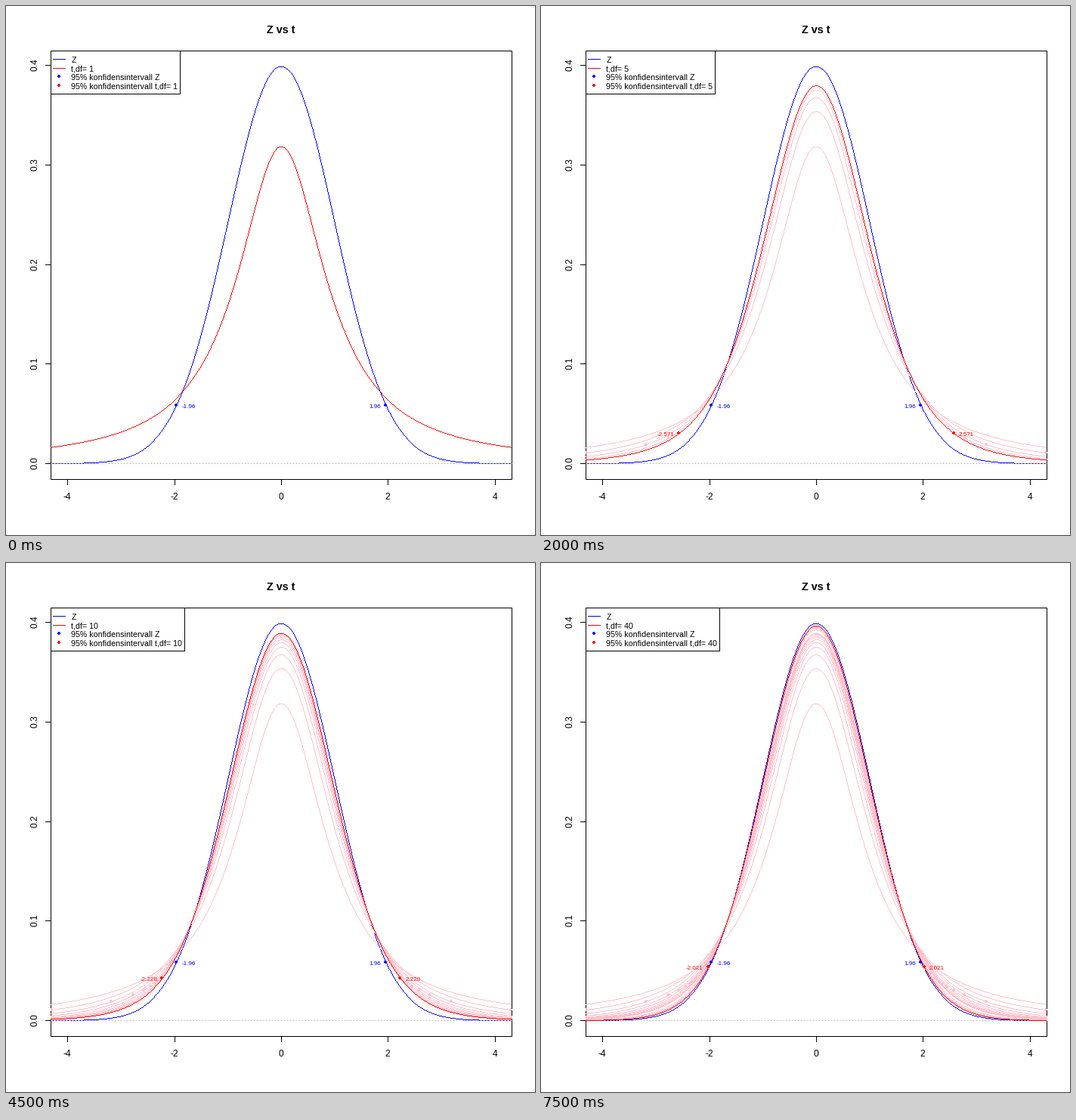
A matplotlib script that plays this animation: 700 by 700 pixels, repeating every 8000 ms.

```python
import math

import matplotlib.pyplot as plt
import numpy as np
from matplotlib.animation import ArtistAnimation
from matplotlib.patches import PathPatch, Rectangle
from matplotlib.path import Path

SIZE, DPI = 700, 100
PT = 72 / DPI  # points per pixel
LEFT, RIGHT, TOP, BOTTOM = 59.04, 669.76, 59.04, 626.56
X_MAX = 4 * 1.08
PEAK = 1 / math.sqrt(2 * math.pi)
DFS = [*range(1, 11), *range(15, 41, 5)]

plt.rcParams["font.family"] = "Liberation Sans"

fig = plt.figure(figsize=(SIZE / DPI, SIZE / DPI), dpi=DPI, facecolor="white")
ax = fig.add_axes([0, 0, 1, 1])
ax.set_xlim(0, SIZE)
ax.set_ylim(SIZE, 0)
ax.axis("off")
region = Rectangle((59, 59), 611, 568, transform=ax.transData)


def px(x):
    return (LEFT + RIGHT) / 2 + x * (RIGHT - LEFT) / (2 * X_MAX)


def py(y):
    return BOTTOM - (y + 0.04 * PEAK) * (BOTTOM - TOP) / (1.08 * PEAK)


def normal_pdf(x):
    return PEAK * np.exp(-x**2 / 2)


def t_pdf(x, df):
    c = math.gamma((df + 1) / 2) / math.gamma(df / 2) / math.sqrt(df * math.pi)
    return c * (1 + x**2 / df) ** (-(df + 1) / 2)


def t_limit(df):
    """97.5% quantile, from x = sqrt(df) tan(a), where the density is cos(a)^(df-1)."""
    a = np.linspace(0, math.pi / 2, 20001)
    w = np.cos(a) ** (df - 1)
    area = np.concatenate([[0], np.cumsum(w[1:] + w[:-1])])
    return math.sqrt(df) * math.tan(np.interp(0.95, area / area[-1], a))


def pixels(xs, ys, color, z):
    """Fill whole pixels, for hard-edged strokes and dots."""
    corners = np.array([[0, 0], [1, 0], [1, 1], [0, 1], [0, 0]])
    cells = np.floor(np.column_stack([xs, ys]))
    path = Path.make_compound_path_from_polys(cells[:, None] + corners)
    patch = ax.add_patch(PathPatch(path, fc=color, lw=0, snap=False, zorder=z))
    return clipped(patch)


def line(xs, ys, color="black", z=1, **kw):
    return ax.plot(xs, ys, color=color, lw=PT, zorder=z, **kw)[0]


def text(x, y, s, size, color="black", ha="left", z=9, **kw):
    return ax.text(x, y, s, fontsize=size * PT, color=color, ha=ha,
                   va="baseline", zorder=z, **kw)


def clipped(artist):
    artist.set_clip_path(region)
    return artist


def curve(pdf, color, z):
    """One pixel per step along the longer direction of each piece."""
    x = np.linspace(-X_MAX, X_MAX, 2401)
    xs, ys = px(x), py(pdf(x))
    step = np.maximum(np.abs(np.diff(xs)), np.abs(np.diff(ys)))
    dist = np.concatenate([[0], np.cumsum(step)])
    at = np.arange(0, dist[-1])
    return pixels(np.interp(at, dist, xs), np.interp(at, dist, ys), color, z)


def dots(points, color, z):
    gx, gy = np.meshgrid(np.arange(-2, 2), np.arange(-2, 2))
    disc = np.hypot(gx + 0.5, gy + 0.5) < 2
    centers = np.floor(np.array(points))
    xs = centers[:, :1] + gx[disc]
    ys = centers[:, 1:] + gy[disc]
    return pixels(xs.ravel(), ys.ravel(), color, z)


def limit_dots(q, y, color, z):
    return dots([(px(-q), py(y)), (px(q), py(y))], color, z)


def limit_labels(q, y, color, outside):
    name = f"{round(q, 3):g}"
    labels = []
    for side, s in ((-1, "-" + name), (1, name)):
        step = side if outside else -side
        t = text(px(side * q) + 6.8 * step, py(y) + 3.6, s, 8, color,
                 "left" if step > 0 else "right", z=8)
        t.set_clip_on(True)
        labels.append(clipped(t))
    return labels


def frame_box(x0, y0, x1, y1, z):
    return ax.add_patch(Rectangle((x0, y0), x1 - x0, y1 - y0, fc="white",
                                  ec="black", lw=PT, zorder=z))


def legend_row(i):
    return TOP + 11.52 * (i + 1)


def legend_text(i, s):
    return text(86.2, legend_row(i) + 4.6, s, 10.6, z=11)


# Plot box, axes and title
frame_box(59, 59, 669, 626, 1)
for v in range(-4, 5, 2):
    x = math.floor(px(v))
    line([x, x], [626, 633])
    text(x, 653, str(v), 12, ha="center")
for k in range(5):
    y = math.floor(py(k / 10))
    line([52, 59], [y, y])
    text(42, y, f"{k / 10:.1f}", 12, ha="center", rotation=90,
         rotation_mode="anchor")
text(math.floor(px(0)), 36, "Z vs t", 14.4, ha="center", weight="bold")

# Normal curve and its limits
curve(normal_pdf, "blue", 2)
line([59, 669], [605, 605], "#bebebe", z=3, dashes=(2, 2),
     dash_capstyle="butt")
limit_dots(1.96, normal_pdf(1.96), "blue", 7)
limit_labels(1.96, normal_pdf(1.96), "blue", outside=False)

# Fixed part of the legend
for i, color in enumerate(("blue", "red")):
    y = math.floor(legend_row(i))
    line([62, 78], [y, y], color, z=11)
    dots([(70, legend_row(i + 2))], color, 11)
legend_text(0, "Z")
legend_text(2, "95% konfidensintervall Z")

frames, trail = [], []
for df in DFS:
    def pdf(x, df=df):
        return t_pdf(x, df)

    q = t_limit(df)
    current = [
        curve(pdf, "red", 5),
        limit_dots(q, pdf(q), "red", 6),
        *limit_labels(q, pdf(q), "red", outside=True),
        frame_box(59, 59, 230 if df < 10 else 236, 116, 10),
        legend_text(1, f"t,df= {df}"),
        legend_text(3, f"95% konfidensintervall t,df= {df}"),
    ]
    frames.append(trail + current)
    trail = trail + [curve(pdf, "pink", 4), limit_dots(q, pdf(q), "pink", 4)]

for artist in trail:
    artist.set_visible(False)

anim = ArtistAnimation(fig, frames, interval=500, repeat=True, repeat_delay=0)
plt.show()
```
